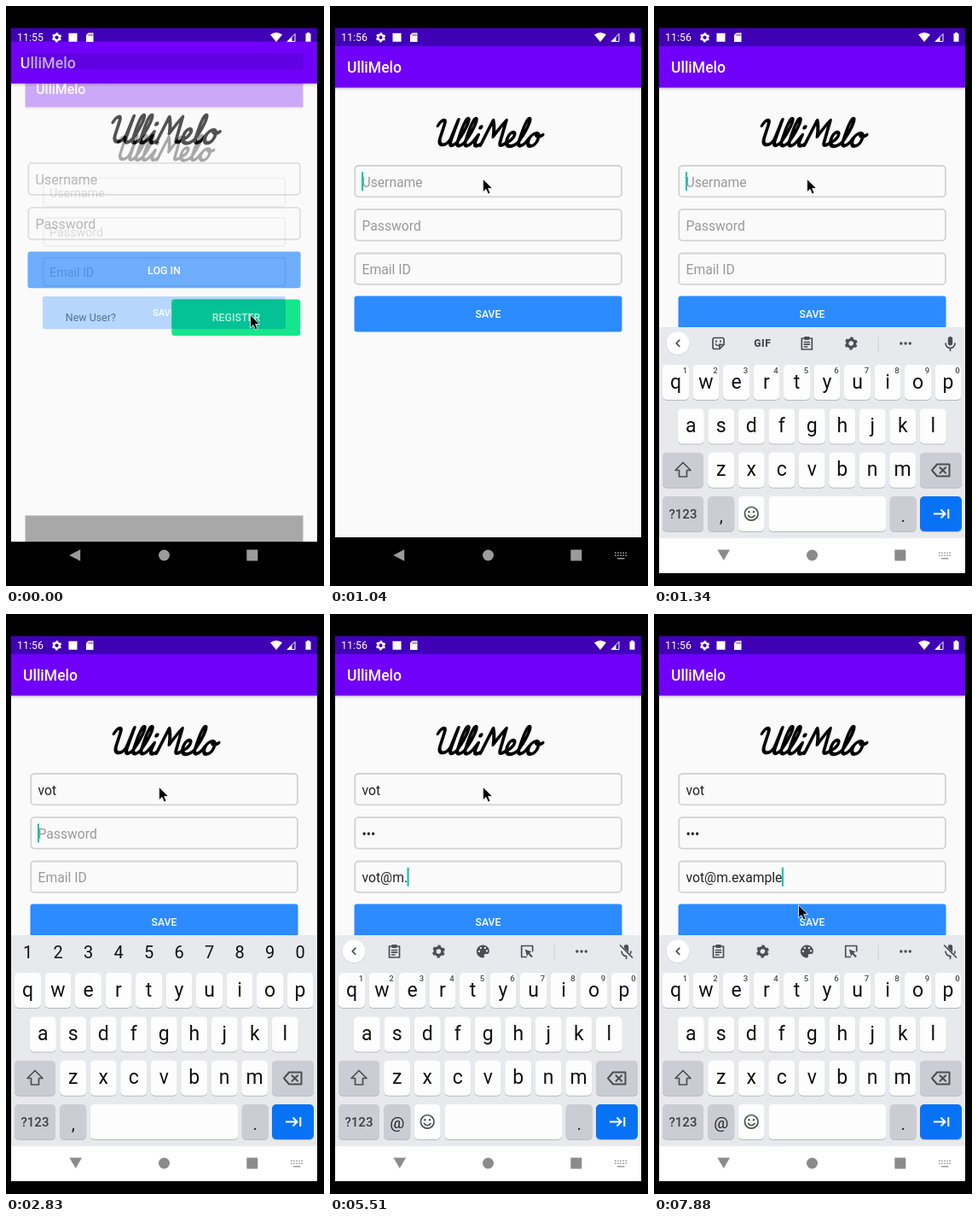
An HTML page that plays this animation: 373x679 px, repeating every 8 s.

```html
<!DOCTYPE html>
<html lang="en">
<head>
<meta charset="utf-8">
<title>Sign-up form</title>
<style>
html, body { margin: 0; width: 100%; height: 100%; overflow: hidden; background: #000; }
svg { display: block; width: 100vw; height: 100vh; }
text { font-family: Roboto, sans-serif; white-space: pre; }
.mid { text-anchor: middle; }
.line { fill: none; stroke: #4b4e53; stroke-width: 1.7; stroke-linejoin: round; stroke-linecap: round; }
.ink { fill: #4b4e53; }
</style>
</head>
<body>
<svg id="stage" viewBox="0 0 373 679"></svg>
<script>
const LOOP = 8000, STEP = 148.5;
const APP = 'UlliMelo';
const NAME = 'vot', MAIL = 'vot@m.example';
const NAME_AT = [2390, 2680, 2680];
const PASS_AT = [3280, 3430, 3570];
const MAIL_AT = [4320, 4470, 4620, 4910, 5210, 5510, 5800, 5950, 6250, 6400, 6550, 6690, 6840];
const FIELD_Y = [187, 238.2, 289.5];
const HINTS = ['Username', 'Password', 'Email ID'];

// ---------- drawing helpers ----------
const rect = (x, y, w, h, fill, r = 0, more = '') =>
  `<rect x="${x}" y="${y}" width="${w}" height="${h}" rx="${r}" fill="${fill}" ${more}/>`;
const text = (x, y, s, size, fill, more = '') =>
  `<text x="${x}" y="${y}" font-size="${size}" fill="${fill}" ${more}>${s}</text>`;
const line = (d, more = '') => `<path class="line" d="${d}" ${more}/>`;
const group = (body, more = '') => `<g ${more}>${body}</g>`;
const at = (x, y, body) => group(body, `transform="translate(${x} ${y})"`);
const mid = 'class="mid"', midBold = 'class="mid" font-weight="500"';

const gear = (color, s) => group(
  `<circle r="4.6" fill="none" stroke="${color}" stroke-width="3.4"/>
   <circle r="6.6" fill="none" stroke="${color}" stroke-width="2.4" stroke-dasharray="3.46 3.45"/>`,
  `transform="rotate(15) scale(${s})"`);

// ---------- app pages ----------
function wordmark() {
  const l = 'c5 -8 9 -27 5 -28c-4 -1 -4 18 -4 26c0 7 5 7 9 2';
  const i = 'l5 -9l-1 8c0 6 5 6 9 1';
  const m = 'm-1 3l6 -29q5 8 7 19q5 -12 10 -19l1 25c0 5 4 5 8 1';
  const e = 'c8 -3 10 -11 5 -12c-6 -1 -8 14 0 16c5 1 8 -2 10 -4';
  const o = 'c3 -7 6 -11 10 -11c-8 0 -10 15 -2 15c8 0 9 -15 2 -15c1 4 5 5 9 2';
  const u = 'M2 -24C4 -31 10 -33 10 -25L10 -9C10 1 22 1 24 -9L26 -31L25 -6C25 0 29 1 33 -4';
  return group(
    `<path d="${u + l + l + i + m + e + l + o}" fill="none" stroke="#000" stroke-width="4.2"
      stroke-linecap="round" stroke-linejoin="round"/><circle cx="58" cy="-22" r="2.7"/>`,
    'transform="translate(117 164) skewX(-18) scale(.91 1)"');
}

const field = y => rect(29.3, y, 312.6, 36.4, 'none', 4, 'stroke="#d3d3d3" stroke-width="1.8"');
const button = (y, label) => rect(28.5, y, 314, 41.9, '#2c8bff', 3) +
  text(185.5, y + 25.6, label, 12.2, '#fff', midBold);

const pageBase = () =>
  rect(6, 95, 359, 527, '#fafafa') + rect(6, 622, 359, 42, '#000') +
  rect(6, 95.6, 359, 4, 'url(#shade)') +
  rect(6, 26, 359, 21, '#4000b6') + rect(6, 47, 359, 48.6, '#7000f9') +
  text(20, 78, APP, 17.5, '#fff', 'font-weight="500"') + wordmark();

const loginPage = () => pageBase() +
  [0, 1].map(i => field(FIELD_Y[i]) + text(37.5, FIELD_Y[i] + 24.5, HINTS[i], 15.7, '#999')).join('') +
  button(288.6, 'LOG IN') + text(72, 368.8, 'New User?', 12.2, '#666');

const signupPage = () => pageBase() + FIELD_Y.map(field).join('') +
  FIELD_Y.map((y, i) => text(37.5, y + 24.5, HINTS[i], 15.7, '#999', `id="val${i}"`)).join('') +
  rect(0, 0, 2, 22, '#00c2a8', 0, 'id="caret"') + button(339.6, 'SAVE');

const registerButton = () => rect(194.3, 343.5, 151, 42.5, '#14e78b', 3.5) +
  rect(194.3, 343.5, 133.7, 34.8, '#04c296', 3) + text(270, 369, 'REGISTER', 12.4, '#b9f2df', midBold);

// ---------- system bars ----------
const statusBar = () =>
  text(13, 41.2, '', 12.4, '#fff', 'id="clock"') +
  at(59.5, 36.8, gear('#fff', .72)) +
  rect(73.5, 31.8, 10, 10, '#fff') +
  '<path d="M96.5 31.5h6v10.5h-8.5v-8z" fill="#fff"/>' +
  '<path d="M97.5 33v2.2M99.3 33v2.2M101 33v2.2" stroke="#4000b6" stroke-width=".8"/>' +
  '<path d="M310 33.6q7 -5 14 0l-7 8.4z" fill="#fff"/>' +
  '<path d="M330 41.5l9 -9v9z" fill="none" stroke="#fff"/><path d="M330 41.5l5.5 -5.5v5.5z" fill="#fff"/>' +
  '<path d="M351.5 32.3h1.6v-1.3h2.8v1.3h1.6v9.5h-6z" fill="#fff"/>';

const navIcons = (color, back) => group(
  `<path d="${back}"/><circle cx="185.5" cy="643" r="6.5"/>` + rect(282.3, 636.5, 13, 13, color), `fill="${color}"`);
const keysIcon = color =>
  `<path d="M334 640.2h14.5M334 643.2h14.5" stroke="${color}" stroke-width="1.6" stroke-dasharray="1.7 1.4"/>` +
  `<path d="M337 646.8h8.5" stroke="${color}" stroke-width="1.5"/>`;

// ---------- keyboard ----------
const key = (x, y, w, fill = '#fdfdfe') =>
  rect(x, y + 1, w, 41, '#b7babf', 5) + rect(x, y, w, 41, fill, 5);
const GREY = '#cacdd4';
const letters = (row, x, y) => [...row].map((c, i) =>
  key(x + i * 35.5, y, 31) + text(x + 15.5 + i * 35.5, y + 27.5, c, 23, '#111', mid)).join('');

const icon = {
  sticker: line('M-6.5 -4.5q0 -2 2 -2h9q2 0 2 2v6l-5 5h-6q-2 0 -2 -2zM6.5 1.5h-3q-2 0 -2 2v3M-3 1q2.5 3 5 0') +
    '<path class="ink" d="M-3.5 -3.5h2v2h-2zM1.5 -3.5h2v2h-2z"/>',
  gif: text(0, 4.3, 'GIF', 12, '#4b4e53', 'class="mid" font-weight="900" letter-spacing=".6"'),
  clip: line('M-6 -6h12v13h-12zM-3 -1.5h6M-3 1.2h6M-3 4h3.5') + '<path class="ink" d="M-3 -8h6v4h-6z"/>',
  gear: gear('#4b4e53', .96),
  palette: '<path class="ink" d="M0 -7.5a7.5 7.5 0 0 0 0 15q2 0 1.5 -2.5q-.5 -2 2 -2h1.5q2.5 0 2.5 -3.5a7.5 7 0 0 0 -7.5 -7z"/>' +
    '<path d="M-4.5 0h.1M-2.5 -4h.1M2.5 -4h.1M4.7 -.5h.1" stroke="#e7e9ed" stroke-width="2.3" stroke-linecap="round"/>',
  touch: line('M-1 6.5h-5.5v-13h13v6') + '<path class="ink" d="M-2.5 -2.5l8 3l-2.8 1.3l4 4l-1.5 1.5l-4 -4l-1.3 2.8z"/>',
  dots: '<path d="M-5.2 0h.1M0 0h.1M5.2 0h.1" stroke="#4b4e53" stroke-width="3.4" stroke-linecap="round"/>',
  mic: rect(-2.7, -8, 5.4, 10.5, '#4b4e53', 2.7) + line('M-5.5 0a5.5 5.5 0 0 0 11 0M0 5.5v2.8')
};

const iconRow = names => names.map((n, i) => at(75.5 + i * 51.9, 395, icon[n])).join('') +
  rect(262.6, 386, 1, 19, '#d0d3d8') + at(295, 395, icon.dots);
const strip = (names, id, muted) =>
  '<circle cx="28" cy="395.3" r="13.8" fill="#c9ccd1"/><circle cx="28" cy="394.7" r="13.5" fill="#fff"/>' +
  group(iconRow(names) + line('M29.8 391.2l-3.6 3.6l3.6 3.6'), `id="${id}"`) +
  line('M26.2 391.2l3.6 3.6l-3.6 3.6', `id="${id}Flip"`) +
  at(347.5, 395, icon.mic + (muted ? '<path d="M-7 -5.5l13 13" stroke="#e7e9ed" stroke-width="4"/>' + line('M-7 -7l14 14') : ''));

const smiley = '<circle class="line" r="7.8"/>' + line('M-3.8 2.2q3.8 4.5 7.6 0') +
  '<circle class="ink" cx="-2.8" cy="-2" r="1.2"/><circle class="ink" cx="2.8" cy="-2" r="1.2"/>';

function keyboard(id, top, comma, digitsOnTop) {
  const digits = [...'1234567890'].map((d, i) => digitsOnTop
    ? text(25.5 + i * 35.5, 403.2, d, 20, '#111', mid)
    : text(36.6 + i * 35.5, 430, d, 9.6, '#4b4e53', midBold)).join('');
  return group(
    rect(6, 376, 359, 247, '#e7e9ed') + rect(6, 623, 359, 41, '#fff') + top +
    letters('qwertyuiop', 10, 420) + digits +
    letters('asdfghjkl', 27.8, 471.5) + letters('zxcvbnm', 63.2, 522.8) +
    key(10, 522.8, 48, GREY) + line('M34 534.5l-9 9h4.5v7.5h9v-7.5h4.5z') +
    key(312, 522.8, 49, GREY) +
    line('M332 536.5h14.5v14h-14.5l-6 -7zM335.5 540.2l6.6 6.6M342.1 540.2l-6.6 6.6', 'style="stroke-width:2"') +
    key(10, 574, 48, GREY) + text(34, 600, '?123', 15, '#3c3f44', midBold) +
    key(63.2, 574, 31, GREY) + text(78.7, comma === '@' ? 602 : 604, comma, comma === '@' ? 19 : 21, '#222', mid) +
    (digitsOnTop ? key(98.7, 574, 173.3) : key(98.7, 574, 31) + at(114.2, 594.3, smiley) + key(134.3, 574, 137.7)) +
    key(276.7, 574, 31, GREY) + text(292.2, 604, '.', 21, '#222', mid) +
    key(312, 574, 49, '#0872f5') +
    '<path d="M328 594.5h13M336.5 589.5l5 5l-5 5M345.3 589v11" fill="none" stroke="#fff" stroke-width="2"/>' +
    navIcons('#8b8b8b', 'M74.5 636.5h14.5l-7.25 12.5z') + keysIcon('#9a9a9a'),
    `id="${id}"`);
}

const pointer = '<path id="pointer" d="M0 0v15.2l3.5 -3.3l2.5 5.6l2.5 -1.1l-2.4 -5.4h4.9z" fill="#000" stroke="#fff" stroke-width=".8"/>';

document.getElementById('stage').innerHTML =
  `<defs><clipPath id="screen">${rect(6, 26, 359, 638, '#000')}</clipPath>
   <linearGradient id="shade" x2="0" y2="1"><stop stop-color="#000" stop-opacity=".16"/>
   <stop offset="1" stop-color="#000" stop-opacity="0"/></linearGradient></defs>` +
  rect(0, 0, 373, 679, '#000') +
  group(
    group(loginPage(), 'id="login"') + group(signupPage(), 'id="signup"') +
    group(registerButton(), 'id="register"') + statusBar() +
    navIcons('#9b9b9b', 'M87.2 636.3v13.4l-13 -6.7z') + group(keysIcon('#9b9b9b'), 'id="keysIcon"') +
    group(
      keyboard('kbName', strip(['sticker', 'gif', 'clip', 'gear'], 'nameIcons', false), ',', false) +
      keyboard('kbPass', '', ',', true) +
      keyboard('kbMail', strip(['clip', 'gear', 'palette', 'touch'], 'mailIcons', true), '@', false),
      'id="keyboard"'),
    'clip-path="url(#screen)"') + pointer;

// ---------- animation ----------
const $ = id => document.getElementById(id);
const show = (id, on) => $(id).setAttribute('display', on ? 'inline' : 'none');
const clamp = v => Math.max(0, Math.min(1, v));
const ease = v => v * v * (3 - 2 * v);
const typed = (s, times, t) => s.slice(0, times.filter(m => t >= m).length);
const zoom = (id, s) => $(id).setAttribute('transform',
  `translate(185.5 345) scale(${s}) translate(-185.5 -345)`);

function setPointer(t, beat) {
  const a = ease(clamp((beat - 290) / 600));
  const b = t < 7430 ? 0 : Math.min(4, Math.floor((t - 7430) / 150) + 1) / 4;
  const x = 286.5 - 107 * a - 10 * ease(b), y = 361.6 - 159 * a + 138 * ease(b);
  $('pointer').setAttribute('transform', `translate(${x} ${y})`);
}

function setFields(t) {
  const values = [typed(NAME, NAME_AT, t), typed('•••', PASS_AT, t), typed(MAIL, MAIL_AT, t)];
  values.forEach((v, i) => {
    const el = $('val' + i);
    el.textContent = v || HINTS[i];
    el.setAttribute('fill', v ? '#222' : '#999');
  });
  const f = t < 2830 ? 0 : t < 3870 ? 1 : 2;
  const w = values[f] ? $('val' + f).getComputedTextLength() : 0;
  $('caret').setAttribute('x', 37 + w);
  $('caret').setAttribute('y', FIELD_Y[f] + 7.3);
  show('caret', t >= 1039 && !(t >= 1490 && t < 1940));
}

function setKeyboard(t, beat) {
  const up = clamp((beat - 1030) / 210);
  $('keyboard').setAttribute('transform', `translate(0 ${288 * (1 - ease(up))})`);
  show('keyboard', beat > 1100);
  show('keysIcon', beat > 1030);
  show('kbName', t < 2830);
  show('kbPass', t >= 2830 && t < 3870);
  show('kbMail', t >= 3870);
  const hideName = t >= 2390, hideMail = t >= 4320 && t < 5210;
  show('nameIcons', !hideName);
  show('nameIconsFlip', hideName);
  show('mailIcons', !hideMail);
  show('mailIconsFlip', hideMail);
}

function draw(t) {
  const beat = Math.floor(t / STEP) * STEP;
  const p = clamp(beat / 297);
  zoom('login', 1.0195 + .06 * p);
  zoom('signup', 1 - .092 * (1 - p) ** 2);
  $('signup').setAttribute('opacity', clamp(.32 + beat / 240));
  $('register').setAttribute('opacity', clamp(1 - beat / 180));
  show('login', p < 1);
  $('clock').textContent = beat < 590 ? '11:55' : '11:56';
  setPointer(t, beat);
  setFields(t);
  setKeyboard(t, beat);
}

const start = performance.now();
function tick() {
  draw((performance.now() - start) % LOOP);
  requestAnimationFrame(tick);
}
tick();
</script>
</body>
</html>
```
